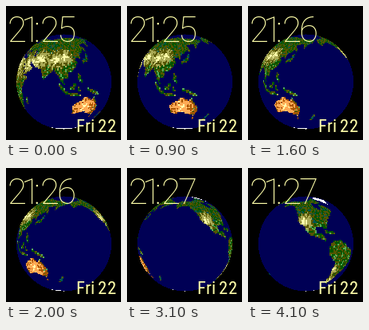
These frames come from a looping animation (144x168 px, 4.3 s). An HTML page with a canvas:

```html
<!DOCTYPE html>
<html lang="en">
<head>
<meta charset="utf-8">
<title>Globe watch face</title>
<style>
  html, body { margin: 0; width: 144px; height: 168px; overflow: hidden; background: #000; }
  canvas, svg { position: absolute; left: 0; top: 0; }
  text { fill: #ffa; font-family: Roboto, sans-serif; }
  #clock { font-size: 44px; font-weight: 200; }
  #date { font-size: 22.5px; font-family: "Roboto Condensed", "Liberation Sans Narrow", Roboto, sans-serif; font-stretch: 75%; }
</style>
</head>
<body>
<canvas id="globe" width="144" height="168"></canvas>
<svg width="144" height="168">
  <text id="clock" y="45" x="2 19 35 43 64">21:25</text>
  <text id="date" y="158" x="88 99 106 112 115 127">Fri 22</text>
</svg>
<script>
const STEP = 100, STEPS = 42, LOOP = 4300;
const CX = 72.5, CY = 95, R = 59.5;
const START_LON = 102.5, LON_PER_STEP = 3.6, TILT = 8 * Math.PI / 180;
const CELL = 2, MAP_W = 360 / CELL, MAP_H = 180 / CELL;

const OCEAN = [0, 0, 85], ICE = [255, 255, 255], TEAL = [0, 85, 85], MEADOW = [85, 170, 85];
const SOIL = [[0, 85, 0], [85, 85, 0], [170, 170, 85], [255, 255, 170]];
const RED_SOIL = [[85, 85, 0], [170, 85, 0], [255, 170, 85], [255, 255, 170]];

// Key points are "lon,lat" in degrees, longitude 0 to 360 east.
const LAND = [
  // Eurasia
  '0,49 10,55 22,55 30,60 22,61 24,66 13,56 6,60 16,69 40,67 68,69 104,77 140,73 180,69 188,66 163,58 157,51 156,60 140,58 141,51 129,42 128,35 125,39 118,39 122,31 116,22 107,19 109,12 101,12 104,2 98,9 95,16 88,22 80,14 77,8 72,21 58,26 49,30 52,24 58,22 44,13 35,29 35,37 27,37 29,41 40,41 32,46 23,38 13,45 0,42',
  // Africa
  '0,36 10,36 20,31 33,31 43,11 51,12 40,-4 40,-15 33,-27 20,-35 12,-17 9,4 0,5',
  // Australia
  '114,-22 132,-11 140,-17 142,-11 153,-27 148,-38 138,-34 130,-32 115,-34',
  // North America and its Arctic islands
  '192,64 204,71 250,69 266,67 268,58 280,52 284,62 296,58 304,50 284,37 279,26 264,29 264,19 272,20 277,10 283,8 274,11 255,20 247,30 239,35 236,48 222,60 208,60 196,56',
  '240,71 280,64 294,66 284,80 262,75',
  // South America
  '282,8 298,11 310,1 325,-7 320,-22 303,-36 292,-53 286,-48 290,-18 279,-5'
];
const ICE_SHEETS = [
  '288,78 330,83 340,71 316,60 306,70',
  '0,-71 165,-71 175,-79 215,-78 290,-73 360,-72 360,-90 0,-90'
];
const ISLAND_ARCS = [
  '96,5 105,-6 114,-8 124,-9', '110,0 114,0 117,5', '120,1 122,-4', '121,18 122,12 126,7',
  '132,-2 140,-5 149,-9', '130,32 137,35 142,43', '142,53 143,46', '173,-37 168,-46',
  '146,-41 147,-43', '46,-23 49,-14', '276,22 290,19', '203,20 205,20'
];
const CASPIAN = '50,46 52,38';

// Desert centres with their radius in degrees.
const DESERTS = [
  [18, 24, 16], [50, 27, 13], [66, 37, 10], [88, 36, 10], [104, 41, 9],
  [130, -25, 14], [248, 37, 10], [290, -26, 6], [292, -42, 7]
];

const random = (x, y) => {
  const s = Math.sin(x * 12.9898 + y * 78.233) * 43758.5453;
  return s - Math.floor(s);
};

function landColour(lon, lat) {
  const dryness = DESERTS.reduce((sum, [x, y, r]) =>
    sum + .75 * Math.exp(-((lon - x) ** 2 + (lat - y) ** 2) / r ** 2), .08);
  if (dryness < .35 && random(lat, lon) < .13) return Math.abs(lat) < 35 ? MEADOW : TEAL;
  const inAustralia = lat < -10 && lon > 112 && lon < 155;
  const level = Math.min(3, Math.floor(dryness * 2.7 + random(lon, lat) * 1.6));
  return (inAustralia ? RED_SOIL : SOIL)[level];
}

function buildMap() {
  const canvas = document.createElement('canvas');
  canvas.width = MAP_W;
  canvas.height = MAP_H;
  const g = canvas.getContext('2d');
  const trace = points => {
    g.beginPath();
    for (const point of points.split(' ')) {
      const [lon, lat] = point.split(',');
      g.lineTo(lon / CELL, (90 - lat) / CELL);
    }
  };
  const fill = points => { trace(points); g.fill(); };
  const stroke = points => { trace(points); g.stroke(); };
  g.lineWidth = 1.6;
  LAND.forEach(fill);
  ISLAND_ARCS.forEach(stroke);
  g.fillStyle = '#fff';
  ICE_SHEETS.forEach(fill);
  g.globalCompositeOperation = 'destination-out';
  stroke(CASPIAN);
  const { data } = g.getImageData(0, 0, MAP_W, MAP_H);
  return Array.from({ length: MAP_W * MAP_H }, (_, i) => {
    if (data[i * 4 + 3] < 115) return OCEAN;
    if (data[i * 4] > 127) return ICE;
    return landColour(i % MAP_W * CELL, 90 - Math.floor(i / MAP_W) * CELL);
  });
}

// Each visible pixel keeps its map row and its longitude from the centre.
function buildSphere() {
  const pixels = [];
  for (let py = 35; py < 156; py++) {
    for (let px = 12; px < 134; px++) {
      const x = (px + .5 - CX) / R, y = (CY - py - .5) / R, zz = 1 - x * x - y * y;
      if (zz < 0) continue;
      const z = Math.sqrt(zz);
      const lat = Math.asin(y * Math.cos(TILT) + z * Math.sin(TILT));
      const lon = Math.atan2(x, z * Math.cos(TILT) - y * Math.sin(TILT));
      const row = Math.min(MAP_H - 1, Math.floor((90 - lat * 180 / Math.PI) / CELL));
      pixels.push({ at: (py * 144 + px) * 4, row, lon: lon * 180 / Math.PI });
    }
  }
  return pixels;
}

const ctx = document.getElementById('globe').getContext('2d');
const clock = document.getElementById('clock');
const image = ctx.createImageData(144, 168);
const map = buildMap(), sphere = buildSphere();
let shown = -1;

function draw(step) {
  const centre = START_LON + step * LON_PER_STEP;
  for (const { at, row, lon } of sphere) {
    const column = Math.floor((lon + centre + 360) % 360 / CELL);
    image.data.set(map[row * MAP_W + column], at);
    image.data[at + 3] = 255;
  }
  ctx.putImageData(image, 0, 0);
  clock.textContent = '21:' + (25 + Math.floor((step + 7) / 18));
}

function tick() {
  const step = Math.min(STEPS - 1, Math.floor(performance.now() % LOOP / STEP));
  if (step !== shown) draw(shown = step);
  requestAnimationFrame(tick);
}
tick();
</script>
</body>
</html>
```
